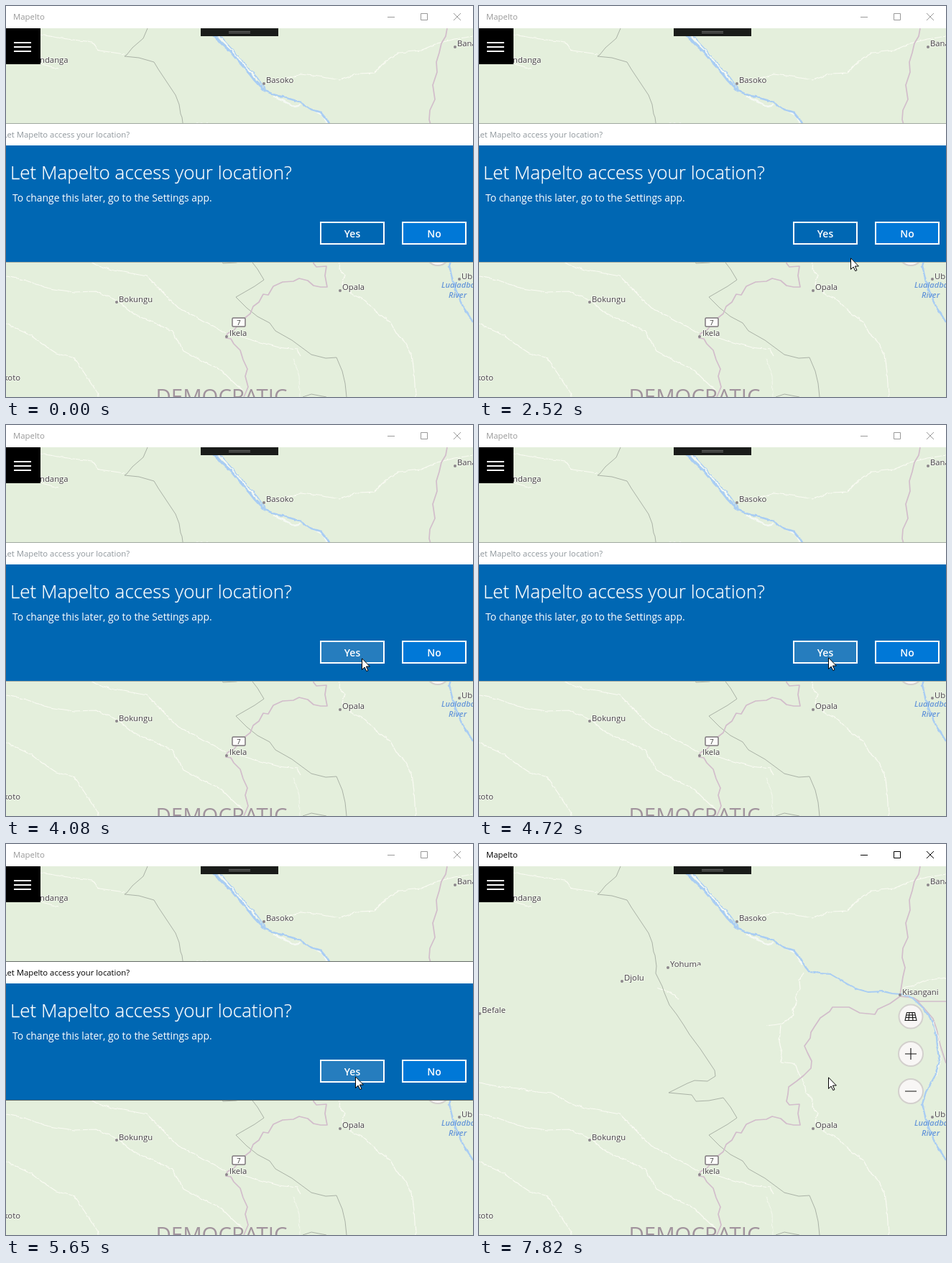
Animation of 650 by 544 pixels, one loop 8000 ms. Source, as an HTML page:

```html
<!DOCTYPE html>
<html lang="en">
<head>
<meta charset="utf-8">
<title>Mapelto</title>
<style>
html, body { margin: 0; width: 100%; height: 100%; overflow: hidden; background: #e4efdc; }
svg { display: block; width: 650px; height: 544px; font-family: "Open Sans", "Noto Sans", sans-serif; }
path { fill: none; stroke-linejoin: round; }
.road { stroke: #fafbf3; stroke-width: 1.2; }
.main { stroke: #d2bdcb; stroke-width: 1.7; }
.border { stroke: #a3aba0; stroke-width: .9; }
.river { stroke: #a9cdf3; }
.town { font-size: 11.3px; fill: #443f44; stroke: #f4f8f0; stroke-width: 1.5px; paint-order: stroke; }
.dots circle { fill: #8d878c; }
.water { font-size: 11px; font-style: italic; font-weight: 600; fill: #6797d8; }
.knob circle { fill: #f8f6f5; stroke: #d3d0cd; stroke-width: 2; }
.icon { stroke: #111; stroke-width: 1.1; }

.bar, .glyph, .dialog, .caption, .edge, .yes, .cursor { animation: 8s step-end infinite; }
.bar { font-size: 11.4px; animation-name: bar; }
.glyph { stroke-width: 1; animation-name: glyph; stroke-linejoin: miter; }
.dialog { animation-name: dialog; }
.caption { font-size: 11.3px; text-anchor: end; animation-name: caption; }
.edge { animation-name: edge; }
.yes { animation-name: yes; }
.cursor { animation-name: move; }
.btn { stroke: #fff; stroke-width: 2; }
.label { font-size: 14px; font-weight: 600; fill: #fff; text-anchor: middle; }

@keyframes bar { 0% { fill: #999; } 72.75%, 100% { fill: #000; } }
@keyframes glyph { 0% { stroke: #999; } 72.75%, 100% { stroke: #000; } }
@keyframes dialog { 0% { visibility: visible; } 72.75%, 100% { visibility: hidden; } }
@keyframes caption { 0% { fill: #8f979c; } 64.625%, 100% { fill: #000; } }
@keyframes edge { 0% { fill: #a0a8a0; } 64.625%, 100% { fill: #646b66; } }
@keyframes yes {
  0% { fill: #0067b3; }
  43.875% { fill: #267dbe; }
  67.5% { fill: #4d95ca; }
  70.625%, 100% { fill: #267dbe; }
}
@keyframes move {
  0% { transform: translate(582px, 560px); }
  9.875% { transform: translate(579px, 534px); }
  11.25% { transform: translate(576px, 521px); }
  12.625% { transform: translate(573px, 508px); }
  14% { transform: translate(569px, 494px); }
  17.75% { transform: translate(557px, 461px); }
  20.875% { transform: translate(549px, 439px); }
  24% { transform: translate(542px, 418px); }
  26.375% { transform: translate(538px, 410px); }
  27.25% { transform: translate(535px, 402px); }
  31.5% { transform: translate(517px, 350px); }
  33.75% { transform: translate(510px, 334px); }
  35.75% { transform: translate(506px, 329px); }
  36.75% { transform: translate(503px, 325px); }
  39.75% { transform: translate(499px, 317px); }
  42% { transform: translate(496px, 324px); }
  43.875% { transform: translate(482px, 324px); }
  49.25% { transform: translate(491px, 324px); }
  51% { transform: translate(495px, 324px); }
  52% { transform: translate(499px, 324px); }
  53% { transform: translate(502px, 324px); }
  55% { transform: translate(501px, 324px); }
  57.125% { transform: translate(491px, 323px); }
  59% { transform: translate(486px, 323px); }
  97.75%, 100% { transform: translate(486px, 324px); }
}
</style>
</head>
<body>
<svg viewBox="0 0 650 544">
  <filter id="rough" filterUnits="userSpaceOnUse" x="0" y="0" width="650" height="544" color-interpolation-filters="sRGB">
    <feTurbulence type="fractalNoise" baseFrequency=".12" numOctaves="2" seed="4"/>
    <feDisplacementMap in="SourceGraphic" scale="4" xChannelSelector="R" yChannelSelector="G"/>
  </filter>
  <rect width="650" height="544" fill="#e4efdc"/>

  <g class="road" filter="url(#rough)">
    <path d="M360 108L378 102 395 100 410 95 435 98 465 103 490 94 513 93 523 82 535 72 548 65 577 62 600 52 625 46 650 42"/>
    <path d="M0 332L25 337 55 340 80 345 103 347 125 360 150 368 175 372 196 376 215 395 240 420 270 435 308 456 330 461 350 467 380 475 405 478 410 487"/>
    <path d="M0 376L25 381 60 393 95 398 125 397 155 410 180 430 205 440 230 452 240 467 247 480 275 495 300 507 315 522 330 536"/>
    <path d="M452 178L446 190 447 202 440 212 443 222 436 230 438 238 422 250 400 253M420 252L418 275 422 290 419 303 436 305 441 308 445 320 452 332 454 345 464 355 463 365 472 375 468 386 480 400 500 410 515 425 535 440 543 455 552 463 565 485 568 510 570 544"/>
    <path d="M0 442L30 455 50 470 70 483 95 490 112 515 130 544"/>
    <path d="M48 40L85 46 120 50 130 62 165 67M50 81L73 87M247 200L265 206 278 215M590 200L605 197 620 190 650 186"/>
    <path d="M400 490L408 515 409 544" opacity=".6"/>
  </g>
  <path class="border" d="M197 31L191 45 176 58 168 68 165 70 185 72 206 78 212 88 218 97 228 112 236 124 241 137 243 150 245 155 247 170 246 180 250 188 255 198 258 207 265 224 275 237 285 252 293 265 308 285 320 303 328 315 329 323 318 330 300 329 290 333 264 346 296 349 302 358 320 357 340 353 350 366 359 381 346 390 320 405 335 420 350 432 367 441 375 452 398 465 425 485 445 490 460 489 468 508 472 525 474 544M413 544L425 540 446 544"/>
  <g class="main">
    <path d="M614 31L612 42 606 52 603 65 599 78 600 92 594 110 597 130 590 145 589 158 593 172 590 185 586 210"/>
    <path d="M586 212L572 222 555 230 551 237 530 235 515 227 492 227 488 233 475 242 467 254 462 262 461 270 453 281 457 290 463 302 462 312 452 322 442 330 431 338 430 348 428 358 432 363 446 362 444 375 447 391 438 391 428 389 420 382 408 379 400 383 385 384 372 390 365 402 358 401 352 412 344 418 340 428 330 436 325 442 318 450 308 456 306 462 313 463 317 470 326 479 330 492 336 505 333 515 337 530 331 544"/>
    <path d="M586 212L605 214 613 219 650 219M608 216L620 229 632 243 637 258 642 280 650 305"/>
  </g>
  <g class="river" filter="url(#rough)">
    <path stroke="#f5f9f4" stroke-width="2.5" d="M294 41L306 53 321 69 336 87 350 102M372 126L388 133 402 140 410 138M428 145L441 152 450 168"/>
    <path stroke-width="3.4" d="M289 40L300 52 312 63 322 75 334 88 345 102 359 117"/>
    <path stroke-width="1.4" d="M297 41L309 54 323 69 337 85 350 100 361 116"/>
    <path stroke-width="2.6" d="M359 117L372 123 387 127 408 133 424 144 438 148 448 160 455 172 460 178"/>
    <path stroke-width="2" d="M460 178L475 180 489 181 508 192 524 201 542 206 562 205 575 208 587 209 603 214 616 226"/>
    <path stroke-width="2.4" d="M616 226L629 243 635 258 637 280 641 302 635 322 622 345 617 362 622 383 628 400 637 420 644 430 650 440"/>
    <path stroke="#f5f9f4" stroke-width="1.1" d="M632 247L639 270 643 300 637 322"/>
  </g>

  <g class="dots">
    <circle cx="359" cy="108" r="2"/><circle cx="625" cy="57" r="2"/><circle cx="263" cy="172" r="2"/>
    <circle cx="199" cy="191" r="2"/><circle cx="1" cy="236" r="2"/><circle cx="586" cy="210" r="2"/>
    <circle cx="154" cy="412" r="2"/><circle cx="465" cy="396" r="2"/><circle cx="307" cy="460" r="2"/>
    <circle cx="631" cy="380" r="2"/>
  </g>
  <g class="town">
    <text x="47" y="79">ndanga</text>
    <text x="362" y="107">Basoko</text>
    <text x="628" y="56">Bana</text>
    <text x="266" y="171">Yohuma</text>
    <text x="202" y="190">Djolu</text>
    <text x="4" y="235">Befale</text>
    <text x="589" y="210">Kisangani</text>
    <text x="157" y="412">Bokungu</text>
    <text x="468" y="395">Opala</text>
    <text x="311" y="459">Ikela</text>
    <text x="634" y="380">Ub</text>
    <text x="20" y="521" text-anchor="end">koto</text>
  </g>
  <rect x="304" y="169" width="8" height="4" fill="#e4efdc"/>
  <text class="water" x="606" y="392">Lualadba</text>
  <text class="water" x="616" y="406">River</text>
  <rect x="315" y="434" width="18" height="12" rx="1.5" fill="#fdfdfb" stroke="#7d777c" stroke-width="1.5"/>
  <text x="324" y="444" font-size="9.5" fill="#333" text-anchor="middle">7</text>
  <text x="208.500" y="554" font-size="29.3" fill="#a1939d">DEMOCRATIC</text>

  <g class="knob">
    <circle cx="601" cy="240" r="16.5"/><circle cx="601" cy="292" r="17"/><circle cx="601" cy="344" r="17"/>
  </g>
  <path class="icon" d="M595.5 234.5H606.5L609 245.5H593ZM594.6 238H607.4M594 241.5H608M599 234.5L598 245.5M603 234.5L604 245.5"/>
  <path class="icon" d="M593 292H609M601 284V300M593 344H609"/>

  <rect width="650" height="31" fill="#fff"/>
  <text class="bar" x="10" y="19">Mapelto</text>
  <path class="glyph" d="M531 15.5H541M577.5 10.5H586.5V19.5H577.5ZM623 10L633 20M633 10L623 20"/>
  <rect y="31" width="48" height="50"/>
  <path d="M11 51H35M11 57H35M11 63H35" stroke="#fff" stroke-width="2"/>
  <rect x="271" y="31" width="108" height="11" fill="#1a1c1a"/>
  <path d="M310 35.5H340M310 37.5H340" stroke="#6c6c6c"/>

  <g class="dialog">
    <rect class="edge" y="163" width="650" height="194"/>
    <rect y="164" width="650" height="30" fill="#fff"/>
    <rect y="194" width="650" height="162" fill="#0067b3"/>
    <text class="caption" x="172" y="183">Let Mapelto access your location?</text>
    <g fill="#fff">
      <text x="6" y="241" font-size="26" font-weight="300" stroke="#fff" stroke-width=".25">Let Mapelto access your location?</text>
      <text x="9" y="272" font-size="13.9">To change this later, go to the Settings app.</text>
    </g>
    <rect class="btn yes" x="438" y="301" width="88" height="30"/>
    <rect class="btn" x="552" y="301" width="88" height="30" fill="#0078d7"/>
    <text class="label" x="482" y="322">Yes</text>
    <text class="label" x="596" y="322">No</text>
  </g>

  <g class="cursor">
    <path d="M.5 .8V16.4L4.1 13 6.8 18.6 9 17.6 6.4 12H11.4Z" style="fill:#fff" stroke="#000"/>
  </g>
</svg>
</body>
</html>
```
